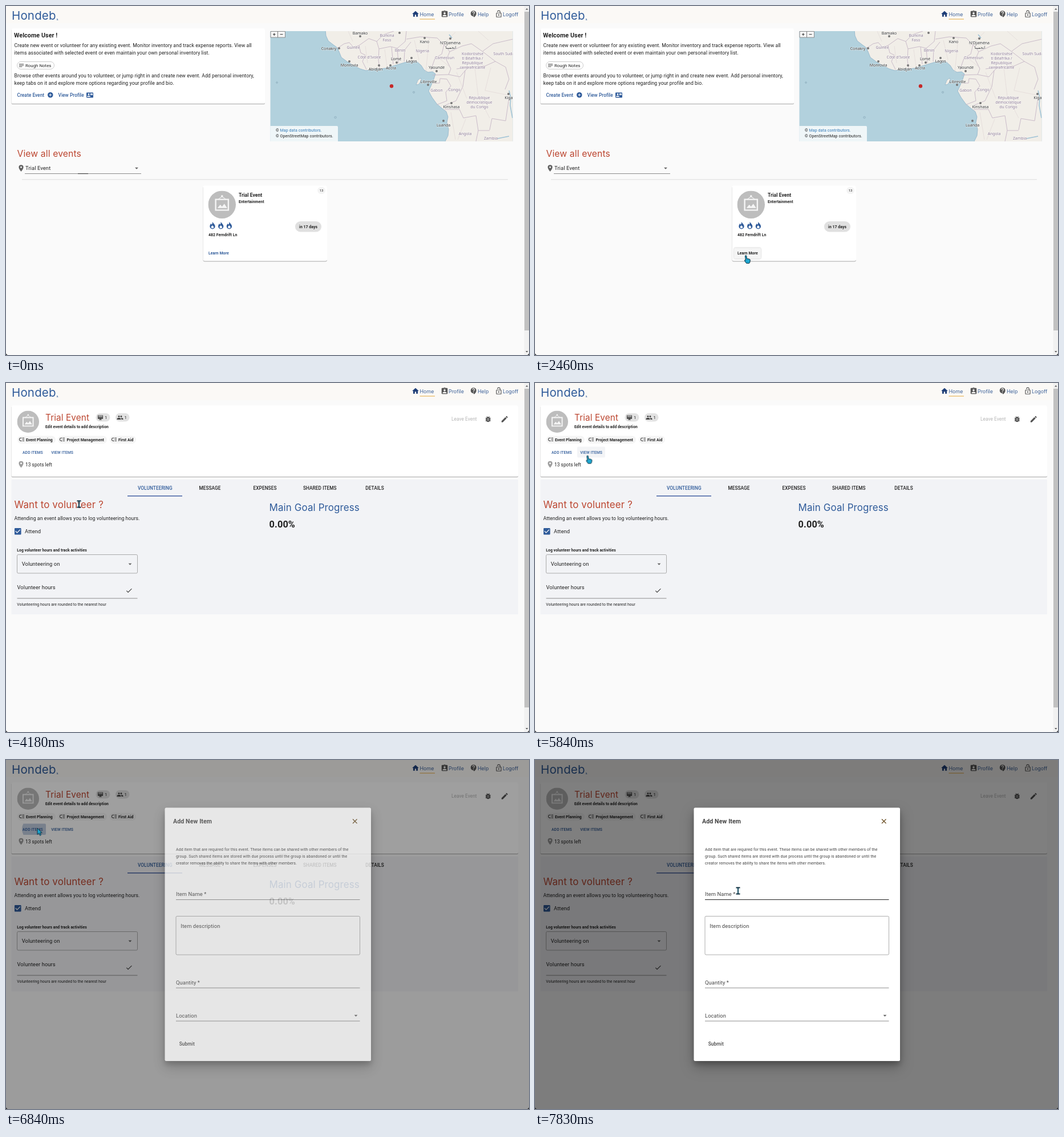
These frames come from a looping animation (917 by 611 pixels, 8000 ms). An HTML page:

```html
<!DOCTYPE html>
<html lang="en">
<head>
<meta charset="utf-8">
<title>Event planner</title>
<style>
html, body { margin: 0; width: 100%; height: 100%; overflow: hidden; background: #fafafa; }
svg { display: block; }
#stage { width: 917px; height: 611px; }
text { font-family: Roboto, sans-serif; letter-spacing: .0094em; fill: #212121; font-size: 8.7px; }
.head { font-family: Inter, sans-serif; letter-spacing: .008em; font-size: 16.9px; }
.nav text { font-family: Inter, sans-serif; font-size: 8.9px; letter-spacing: 0; fill: #3f639a; }
.red { fill: #bc4630; }
.blue, text.blue { fill: #2f5b9a; }
.b { font-weight: 700; }
.m { font-weight: 500; }
.xs { font-size: 6.85px; }
.s { font-size: 8.25px; }
.f { font-size: 9.4px; }
.para text { font-size: 7.06px; fill: #444; }
.form text { fill: #444; }
.line { stroke: #8c8c8c; fill: none; }
.map text { font: 6.9px "Noto Sans", "DejaVu Sans", sans-serif; text-anchor: middle; letter-spacing: 0;
  paint-order: stroke; stroke: #fffc; stroke-width: 1px; fill: #333; }
.map .land text { fill: #8c7a94; }
.card { fill: #fff; filter: drop-shadow(0 1px .7px #0005); }
.sheet { fill: #fff; filter: drop-shadow(0 6px 4px #0003) drop-shadow(0 9px 11px #0004); }

.a { animation: 8s step-end infinite; }
.first { animation-name: first; }
.second { animation-name: second; }
.focus { animation-name: focus; transform-origin: 135px 293px; }
.learn { animation-name: learn; }
.learnText { animation-name: learnText; }
.viewHover { animation-name: viewHover; }
.addHover { animation-name: addHover; }
.ripple { animation-name: ripple; transform-origin: 55px 121px; }
.bar { animation-name: bar; }
.fade { animation-name: fade; }
.nameLine { animation-name: nameLine; }
.arrow { animation-name: arrow; }
.hand { animation-name: hand; }
.beam { animation-name: beam; }
.cursor { animation: move 8s linear infinite; }

@keyframes first { 0% { opacity: 1 } 31.5%, 100% { opacity: 0 } }
@keyframes second { 0% { opacity: 0 } 31.5%, 100% { opacity: 1 } }
@keyframes focus { 0% { transform: none } .875% { transform: scaleX(.4) } 1.75%, 100% { transform: scaleX(0) } }
@keyframes learn { 0% { opacity: 0 } 19.1% { opacity: .5 } 20% { opacity: 1 } 31.5%, 100% { opacity: 0 } }
@keyframes learnText { 0% { fill: #2f5b9a } 19.1%, 100% { fill: #212121 } }
@keyframes viewHover { 0% { opacity: 0 } 66.5% { opacity: 1 } 75.5%, 100% { opacity: 0 } }
@keyframes addHover { 0% { opacity: 0 } 75.5% { opacity: 1 } 85.5%, 100% { opacity: 0 } }
@keyframes ripple {
  0% { opacity: 0; transform: scale(0) }
  82.125% { opacity: 1; transform: scale(.15) }
  82.95% { opacity: 1; transform: scale(.28) }
  83.8% { opacity: 1; transform: scale(.4) }
  84.625% { opacity: 1; transform: scale(.54) }
  85.5% { opacity: 1; transform: scale(.74) }
  86.25% { opacity: .8; transform: none }
  87.1% { opacity: .5; transform: none }
  88% { opacity: .2; transform: none }
  89%, 100% { opacity: 0; transform: none }
}
@keyframes bar { 0% { opacity: 1 } 84.625%, 100% { opacity: 0 } }
@keyframes fade { 0% { opacity: 0 } 84.625% { opacity: .17 } 85.5% { opacity: .75 } 86.25% { opacity: .97 } 87.125%, 100% { opacity: 1 } }
@keyframes nameLine { 0% { stroke: #8c8c8c } 97%, 100% { stroke: #212121 } }
@keyframes arrow {
  0% { opacity: 0 } 6.625% { opacity: 1 } 19.1% { opacity: 0 } 31.5% { opacity: 1 } 51.4% { opacity: 0 }
  55.6% { opacity: 1 } 66.5% { opacity: 0 } 84.625% { opacity: 1 } 92.1% { opacity: 0 }
  94.6% { opacity: 1 } 97%, 100% { opacity: 0 }
}
@keyframes hand { 0% { opacity: 0 } 19.1% { opacity: 1 } 31.5% { opacity: 0 } 66.5% { opacity: 1 } 84.625%, 100% { opacity: 0 } }
@keyframes beam {
  0% { opacity: 0 } 51.4% { opacity: 1 } 55.6% { opacity: 0 } 92.1% { opacity: 1 } 94.6% { opacity: 0 } 97%, 100% { opacity: 1 }
}
@keyframes move {
  0% { transform: translate(930px, 609px) }
  6.625% { transform: translate(930px, 609px); animation-timing-function: steps(12, jump-both) }
  16.625% { transform: translate(376px, 446px) }
  17.375% { transform: translate(376px, 446px); animation-timing-function: steps(5, jump-both) }
  21.625% { transform: translate(370px, 437px) }
  44% { transform: translate(370px, 437px); animation-timing-function: steps(10, jump-both) }
  52.25% { transform: translate(128px, 212px) }
  54.75% { transform: translate(128px, 212px); animation-timing-function: steps(9, jump-both) }
  63.125% { transform: translate(97px, 138px) }
  65.625% { transform: translate(97px, 138px); animation-timing-function: steps(5, jump-both) }
  69.75% { transform: translate(92.5px, 127.5px) }
  73.1% { transform: translate(92.5px, 127.5px); animation-timing-function: steps(6, jump-both) }
  78% { transform: translate(55px, 119.5px) }
  86.3% { transform: translate(55px, 119.5px); animation-timing-function: steps(7, jump-both) }
  92.125% { transform: translate(300px, 172px) }
  92.875% { transform: translate(300px, 172px); animation-timing-function: steps(5, jump-both) }
  97.875%, 100% { transform: translate(356px, 229px) }
}
</style>
</head>
<body>
<svg id="stage" viewBox="0 0 917 611">
<defs>
  <symbol id="home" viewBox="0 0 24 24"><path d="M10 20v-6h4v6h5v-8h3L12 3 2 12h3v8z"/></symbol>
  <symbol id="badge" viewBox="0 0 24 24"><path d="M19 3h-4.2a3 3 0 0 0-5.6 0H5a2 2 0 0 0-2 2v14c0 1.1.9 2 2 2h14a2 2 0 0 0 2-2V5a2 2 0 0 0-2-2zm-7 0a1 1 0 1 1 0 2 1 1 0 0 1 0-2zm0 4a3 3 0 1 1 0 6 3 3 0 0 1 0-6zm6 12H6v-1.4c0-2 4-3.1 6-3.1s6 1.1 6 3.1z"/></symbol>
  <symbol id="help" viewBox="0 0 24 24"><path d="M11.5 2a8.5 8.5 0 0 0 0 17h.5v3c4.9-2.3 8-7 8-11.5A8.5 8.5 0 0 0 11.5 2zm1 14.5h-2v-2h2zm0-3.5h-2c0-3.2 3-3 3-5a2 2 0 0 0-4 0h-2a4 4 0 0 1 8 0c0 2.5-3 2.8-3 5z"/></symbol>
  <symbol id="lock" viewBox="0 0 24 24"><path d="M12 17a2 2 0 1 0 0-4 2 2 0 0 0 0 4zm6-9h-1V6A5 5 0 0 0 7 6h1.9a3.1 3.1 0 0 1 6.2 0v2H6a2 2 0 0 0-2 2v10c0 1.1.9 2 2 2h12a2 2 0 0 0 2-2V10a2 2 0 0 0-2-2zm0 12H6V10h12z"/></symbol>
  <symbol id="notes" viewBox="0 0 24 24"><path d="M3 18h12v-2H3zM3 6v2h18V6zm0 7h18v-2H3z"/></symbol>
  <symbol id="plus" viewBox="0 0 24 24"><path d="M12 2a10 10 0 1 0 0 20 10 10 0 0 0 0-20zm5 11h-4v4h-2v-4H7v-2h4V7h2v4h4z"/></symbol>
  <symbol id="contact" viewBox="0 0 24 24"><path d="M2 3h20a2 2 0 0 1 2 2v14a2 2 0 0 1-2 2H2a2 2 0 0 1-2-2V5c0-1 1-2 2-2zm6 3a3 3 0 1 0 0 6 3 3 0 0 0 0-6zm6 12v-1c0-2-4-3-6-3s-6 1-6 3v1zM14 6v6h8V6zm1 1l3 2 3-2v1l-3 2-3-2z"/></symbol>
  <symbol id="pin" viewBox="0 0 24 24"><path d="M12 2a7 7 0 0 0-7 7c0 5.2 7 13 7 13s7-7.8 7-13a7 7 0 0 0-7-7zm0 9.5a2.5 2.5 0 1 1 0-5 2.5 2.5 0 0 1 0 5z"/></symbol>
  <symbol id="drop" viewBox="0 0 24 24"><path d="M7 10l5 5 5-5z"/></symbol>
  <symbol id="flame" viewBox="0 0 24 24"><path d="M12 1c1 4 8 8 8 14a8 8 0 0 1-16 0c0-4 2-6 4-9 0 2 1 3 2 4 2-3 2-6 2-9zm0 11c-2 2-4 3-4 5a4 4 0 0 0 8 0c0-2-3-3-4-5z" fill-rule="evenodd"/></symbol>
  <symbol id="tasks" viewBox="0 0 24 24"><path d="M14 5h8v2h-8zm0 5.5h8v2h-8zm0 5.5h8v2h-8zM2 11.5A6.5 6.5 0 0 0 8.5 18H9v2l3-3-3-3v2h-.5a4.5 4.5 0 0 1 0-9H12V5H8.5A6.5 6.5 0 0 0 2 11.5z"/></symbol>
  <symbol id="people" viewBox="0 0 24 24"><path d="M16 11a3 3 0 1 0-3-3 3 3 0 0 0 3 3zm-8 0a3 3 0 1 0-3-3 3 3 0 0 0 3 3zm0 2c-2.3 0-7 1.2-7 3.5V19h14v-2.5C15 14.2 10.3 13 8 13zm8 0h-1c1.2.9 2 2 2 3.5V19h6v-2.5c0-2.3-4.7-3.5-7-3.5z"/></symbol>
  <symbol id="screen" viewBox="0 0 24 24"><path d="M2 3h20v14h-8v2h3v2H7v-2h3v-2H2zm2 2v2h16V5zm0 4v2h16V9z" fill-rule="evenodd"/></symbol>
  <symbol id="bug" viewBox="0 0 24 24"><path d="M20 8h-2.8a6 6 0 0 0-1.8-2L17 4.4 15.6 3l-2.2 2.2a6 6 0 0 0-2.8 0L8.4 3 7 4.4 8.6 6a6 6 0 0 0-1.8 2H4v2h2.1L6 12H4v2h2l.1 2H4v2h2.8a6 6 0 0 0 10.4 0H20v-2h-2.1l.1-2h2v-2h-2l-.1-2H20zm-6 8h-4v-2h4zm0-4h-4v-2h4z"/></symbol>
  <symbol id="edit" viewBox="0 0 24 24"><path d="M3 17.2V21h3.8L17.8 9.9l-3.7-3.7zM20.7 7a1 1 0 0 0 0-1.4l-2.3-2.3a1 1 0 0 0-1.4 0l-1.9 1.8 3.8 3.8z"/></symbol>
  <symbol id="check" viewBox="0 0 24 24"><path d="M9 16.2 4.8 12l-1.4 1.4L9 19 21 7l-1.4-1.4z"/></symbol>
  <symbol id="box" viewBox="0 0 24 24"><path d="M19 3H5a2 2 0 0 0-2 2v14c0 1.1.9 2 2 2h14a2 2 0 0 0 2-2V5a2 2 0 0 0-2-2zm-9 14l-5-5 1.4-1.4 3.6 3.6 7.6-7.6L19 8z"/></symbol>
  <symbol id="avatar" viewBox="0 0 48 48">
    <circle cx="24" cy="24" r="24" fill="#bdbdbd"/>
    <g fill="none" stroke="#f5f5f5" stroke-width="2.4"><path d="M13 15h22v18.5H13z"/><path d="M17 15l7-5 7 5" stroke-width="1"/></g>
    <path d="M16 30l5-6 3 3.5 4-5 5 7.5zM24 7.5a1.7 1.7 0 1 0 .1 0z" fill="#f5f5f5"/>
  </symbol>
  <clipPath id="mapClip"><path d="M463.5 44h425v193h-425z"/></clipPath>
  <clipPath id="addClip"><rect x="24" y="111.5" width="46" height="19.5" rx="2"/></clipPath>
</defs>

<path fill="#fafafa" d="M0 0h917v611H0z"/>
<path fill="#fbf9f6" d="M0 0h917v30H0z"/>
<text class="head blue" x="10" y="23.7" style="font-size:20.5px">Hondeb</text>
<text class="blue" x="88.5" y="24.5" style="font-size:5px">a.</text>
<g class="nav" fill="#555">
  <use href="#home" x="711" y="7" width="14" height="14" fill="#1f3f78"/><text x="725.5" y="18.3">Home</text>
  <path d="M725.5 23h26.5" stroke="#e9b75c" stroke-width="1.2"/>
  <use href="#badge" x="762" y="7" width="14" height="14"/><text x="776" y="18.3">Profile</text>
  <use href="#help" x="813" y="7" width="14" height="14"/><text x="827" y="18.3">Help</text>
  <use href="#lock" x="857" y="7" width="14" height="14"/><text x="871" y="18.3">Logoff</text>
</g>

<g class="a first">
  <rect class="card" x="9.5" y="39.5" width="444.5" height="131.5" rx="2"/>
  <text class="b" x="14" y="55.3" style="font-size:10.7px">Welcome User !</text>
  <text x="14.5" y="72.3">Create new event or volunteer for any existing event. Monitor inventory and track expense reports. View all</text>
  <text x="14.5" y="85.3">items associated with selected event or even maintain your own personal inventory list.</text>
  <rect x="19.5" y="97.5" width="65" height="13" rx="6.5" fill="#fff" stroke="#bdbdbd" stroke-width=".8"/>
  <use href="#notes" x="21.5" y="98.5" width="11" height="11" fill="#555"/>
  <text x="34" y="106.8" style="font-size:7.75px">Rough Notes</text>
  <text x="14.5" y="125.3">Browse other events around you to volunteer, or jump right in and create new event. Add personal inventory,</text>
  <text x="14.5" y="138.3">keep tabs on it and explore more options regarding your profile and bio.</text>
  <g class="blue">
    <text class="m s blue" x="19.5" y="158.8">Create Event</text><use href="#plus" x="72" y="150" width="11.5" height="11.5"/>
    <text class="m s blue" x="91.5" y="158.8">View Profile</text><use href="#contact" x="141" y="150" width="12" height="12"/>
  </g>

  <g class="map" clip-path="url(#mapClip)">
    <path fill="#b2d1dd" d="M463 44h426v193H463z"/>
    <path fill="#f1eee8" stroke="#8fb3c9" stroke-width=".8" d="M560 42l1 10 4 9 9 7 7 5 3 7 4 10 11 8 12 7 10 5 10 3 12-2 22-2 17-5 20-6 18-1 8 7 5 8 7 4 8-1 5 4-3 9-5 12-4 9 6 11 8 11 8 7 9 7 3 9-2 10 3 12-1 11-6 12h130V42z"/>
    <path fill="#f1eee8" stroke="#8fb3c9" stroke-width=".7" d="M719 138l3-8 5-4 1 4-4 7z"/>
    <g fill="none" stroke="#c6b6c6" stroke-width=".9">
      <path d="M581 74l12-8 9-2 7 8 10-3 3 13 8 4-5 11 7 14M619 69l17-12 14 5 4 13-1 20 2 14M650 62l12-12 18-6M654 75l20-4 12 3 2 26M676 72l3 30M686 74l14-12 2-18M698 97l1-20 11-14M702 58l24-4 30 2 12 12-4 16-12 8-7 20M768 68l10 12-6 14 8 16-4 10-28 1M778 80l22-10 16-4 20 14 22 17-18 8-24 2-26 3M748 135h12l1-8 12 1 7 12-9 11 2 15-18 7M776 120l20 4 9-11 8-7M805 113l-4 28-12 25-20 8M769 181l26 0 7 15 22-4 4 26h20M828 218l-4 19M848 217l4-20 24 4 6-40M858 97l18 10 6 21-7 18M836 79l18-13 35-8"/>
      <path stroke="#ddd4d4" stroke-width=".6" d="M600 44l8 18M634 100l-4-30M668 106l-4-30M716 60l8 34M742 56l-6 60M762 70l26-24M790 116l18 46M822 108l6 50 20 38M850 108l-10 40 40 8M780 186l8 48M806 198l-14 36M846 60l-18-16M760 92l20 16"/>
    </g>
    <path fill="none" stroke="#9fc3d6" stroke-width="1.6" d="M882 148l3 12-1 14 4 22M862 232l20-4M777 50l5 6"/>
    <g fill="none" stroke="#88a9b9" stroke-width=".8"><circle cx="475" cy="134" r="1.3"/><circle cx="577.5" cy="195" r="1.7"/><circle cx="715" cy="151" r="1.5"/></g>
    <path fill="none" stroke="#777" stroke-width="4" stroke-linecap="round" d="M621 53h0M584 74h0M602 97h0M654 104h0M674 104h0M685 99h0M711 91h0M690 47h0M734 56h0M779 57h0M755 114h0M740 138h0M781 170h0M767 201h0M881 154h0"/>
    <g class="land">
      <text x="609" y="75">Guinée</text><text x="668" y="54">Burkina</text><text x="668" y="62">Faso</text>
      <text x="637" y="92">Côte d'Ivoire</text><text x="691" y="79.5">Bénin</text><text x="730" y="81">Nigeria</text>
      <text x="769" y="92.5">Cameroun</text><text x="755" y="149.5">Gabon</text><text x="786" y="148.5">Congo</text>
      <text x="818" y="85.5">Kodorösëse</text><text x="818" y="93.5">tî Bêafrîka /</text><text x="818" y="101.5">République</text><text x="818" y="109.5">centrafricaine</text>
      <text x="830" y="162.5">République</text><text x="830" y="170.5">démocratique</text><text x="830" y="178.5">du Congo</text>
      <text x="875" y="85.5">South Sudan</text><text x="805" y="225.5">Angola</text><text x="850" y="234">Zambia</text>
    </g>
    <text x="621" y="49.5">Bamako</text><text x="566" y="77">Conakry</text><text x="602" y="105.5">Monrovia</text>
    <text x="648" y="113">Abidjan</text><text x="675" y="111">Accra</text><text x="684" y="95">Lomé</text><text x="711" y="99">Lagos</text>
    <text x="734" y="64.5">Kano</text><text x="779" y="67">N'Djaména</text><text x="780" y="75">انجمينا</text>
    <text x="755" y="110">Yaoundé</text><text x="741" y="134.5">Libreville</text><text x="781" y="178.5">Kinshasa</text>
    <text x="767" y="210.5">Luanda</text><text x="883" y="162.5">Kigali</text>
    <circle cx="676" cy="140.3" r="3.2" fill="#c62828"/>
    <path fill="#fffc" d="M463 210h117q2 0 2 2v26H463z"/>
  </g>
  <text x="473" y="220.3" style="font-size:7.1px">© <tspan fill="#337ab7">Map data contributors.</tspan></text>
  <text x="473" y="230.3" style="font-size:7.1px">© OpenStreetMap contributors.</text>
  <path fill="#f6f6f6" stroke="#777" stroke-width=".8" d="M464 44.5h12.5V55H464zM476.5 44.5H489.5V55H476.5z"/>
  <path stroke="#333" d="M468 49.7h4.5M470.25 47.5v4.5M480.5 49.7h5"/>

  <text class="head red" x="19.5" y="263.5" style="font-size:15.7px">View all events</text>
  <use href="#pin" x="19.5" y="277" width="14" height="14" fill="#616161"/>
  <text class="f" x="34" y="287.3">Trial Event</text>
  <use href="#drop" x="222" y="277" width="14" height="14" fill="#616161"/>
  <path class="line" d="M33 293.5h204"/>
  <path class="a focus" stroke="#444" stroke-width="1.2" d="M126 293.5h18"/>
  <path stroke="#dcdcdc" d="M28 303.8h852"/>

  <rect class="card" x="345.5" y="314.5" width="217.5" height="132" rx="3"/>
  <use href="#avatar" x="354.5" y="323.5" width="48.5" height="48.5"/>
  <text class="b" x="408" y="333.5" style="font-size:8.5px">Trial Event</text>
  <text class="b xs" x="408" y="345.3">Entertainment</text>
  <rect x="546" y="317" width="14" height="12" rx="6" fill="#f4f4f4"/>
  <text x="549.7" y="325.3" style="font-size:6px">13</text>
  <g class="blue"><use href="#flame" x="355" y="377" width="14" height="14"/><use href="#flame" x="369.7" y="377" width="14" height="14"/><use href="#flame" x="384.4" y="377" width="14" height="14"/></g>
  <rect x="507" y="377" width="46" height="18.5" rx="9.25" fill="#e0e0e0"/>
  <text class="b xs" x="514" y="388.6">in 17 days</text>
  <text class="b xs" x="355" y="403">482 Ferndrift Ln</text>
  <rect class="a learn" x="349" y="423.5" width="47" height="19" rx="2" fill="#f5f5f5" style="filter:drop-shadow(0 .5px 1px #0004)"/>
  <text class="b xs a learnText" x="355" y="435.4">Learn More</text>
</g>

<g class="a second">
  <rect class="card" x="9.5" y="39.5" width="888.5" height="124.5" rx="2"/>
  <use href="#avatar" x="19.5" y="48.5" width="38.5" height="38.5"/>
  <text class="head red" x="69" y="66" style="font-size:15.3px">Trial Event</text>
  <g fill="#e2e2e2"><rect x="157.5" y="53" width="25" height="14.5" rx="7.25"/><rect x="192" y="53" width="24.5" height="14.5" rx="7.25"/></g>
  <use href="#screen" x="160" y="55" width="11" height="11" fill="#444"/><text x="173" y="63.2" style="font-size:7.7px">1</text>
  <use href="#people" x="194" y="54.5" width="12" height="12" fill="#444"/><text x="207.5" y="63.2" style="font-size:7.7px">1</text>
  <text class="b" x="69" y="79.3" style="font-size:6.75px">Edit event details to add description</text>
  <g fill="#f5f5f5"><rect x="20" y="92.5" width="67" height="13.5" rx="6.75"/><rect x="91" y="92.5" width="86" height="13.5" rx="6.75"/><rect x="182" y="92.5" width="46" height="13.5" rx="6.75"/></g>
  <g fill="#444"><use href="#tasks" x="22" y="93.5" width="11" height="11"/><use href="#tasks" x="93" y="93.5" width="11" height="11"/><use href="#tasks" x="184" y="93.5" width="11" height="11"/></g>
  <text class="b xs" x="35" y="101.6">Event Planning</text><text class="b xs" x="106.5" y="101.6">Project Management</text><text class="b xs" x="197" y="101.6">First Aid</text>
  <rect class="a addHover" x="24" y="111.5" width="46" height="19.5" rx="2" fill="#2f5b9a" fill-opacity=".06"/>
  <g clip-path="url(#addClip)"><circle class="a ripple" cx="55" cy="121" r="36" fill="#2f5b9a" fill-opacity=".3"/></g>
  <rect class="a viewHover" x="74" y="111.5" width="49" height="19" rx="2" fill="#f3f4f6"/>
  <text class="m xs blue" x="29" y="123.5">ADD ITEMS</text><text class="m xs blue" x="79.3" y="123.5">VIEW ITEMS</text>
  <use href="#pin" x="19.5" y="135.5" width="14" height="14" fill="#9e9e9e"/><text class="s" x="34" y="145.5">13 spots left</text>
  <text class="s" x="781" y="65.7" style="fill:#b5b5b5">Leave Event</text>
  <use href="#bug" x="838.5" y="56.5" width="13.5" height="13.5" fill="#555"/><use href="#edit" x="867" y="56" width="14.5" height="14.5" fill="#555"/>

  <path fill="#f2f3f6" d="M9.5 169H898v236H9.5z"/>
  <g class="m" text-anchor="middle">
    <text class="s blue" x="261.3" y="186.8">VOLUNTEERING</text><text class="s" x="357.5" y="186.8">MESSAGE</text><text class="s" x="454" y="186.8">EXPENSES</text>
    <text class="s" x="550.3" y="186.8">SHARED ITEMS</text><text class="s" x="646.5" y="186.8">DETAILS</text>
  </g>
  <path stroke="#4561a4" stroke-width="1.4" d="M213 197.7h96"/>
  <text class="head red" x="14.5" y="219">Want to volunteer ?</text>
  <text x="14.5" y="239.8">Attending an event allows you to log volunteering hours.</text>
  <use href="#box" x="13" y="252" width="15.5" height="15.5" class="blue"/><text class="f" x="33" y="262.8">Attend</text>
  <text class="b" x="19.3" y="294.6" style="font-size:6.75px">Log volunteer hours and track activities</text>
  <rect class="line" x="19.5" y="300.5" width="211" height="32.5" rx="2" stroke-opacity=".7"/>
  <text class="f" x="27.7" y="320.2">Volunteering on</text><use href="#drop" x="210.5" y="310" width="14" height="14" fill="#616161"/>
  <text class="f" x="19.5" y="361">Volunteer hours</text><use href="#check" x="209" y="356.5" width="13.5" height="13.5" fill="#444"/>
  <path class="line" d="M19.5 377h211"/>
  <text x="19.3" y="389.6" style="font-size:6.8px">Volunteering hours are rounded to the nearest hour</text>
  <text class="head blue" x="461.5" y="223.8">Main Goal Progress</text>
  <text class="b" x="461.5" y="253.3" style="font-size:16.3px">0.00%</text>
</g>

<g class="a bar">
  <path fill="#f1f1f1" d="M908.5 0h8.5v611h-8.5z"/>
  <path fill="#c1c1c1" d="M909 10h8v558h-8z"/>
  <path fill="#555" d="M911 6.5l2.2-2.5 2.2 2.5zM911 604l2.2 2.5 2.2-2.5z"/>
</g>

<!-- Backdrop and dialog fade separately so the dim page shows through the dialog -->
<path class="a fade" fill="#000" fill-opacity=".5" d="M0 0h917v611H0z"/>
<g class="a fade form">
  <rect class="sheet" x="278.5" y="83.5" width="361.5" height="443.5" rx="2.5"/>
  <text class="b blue" x="293" y="111" style="font-size:10.6px">Add New Item</text>
  <path d="M608 103.5l7.5 7.5m0-7.5l-7.5 7.5" stroke="#6b4f25" stroke-width="1.3"/>
  <g class="para">
    <text x="298" y="158.7">Add item that are required for this event. These items can be shared with other members of the</text>
    <text x="298" y="170.7">group. Such shared items are stored with due process until the group is abandoned or until the</text>
    <text x="298" y="182.7">creator removes the ability to share the items with other members.</text>
  </g>
  <text class="f" x="298" y="238.2">Item Name *</text>
  <path class="line a nameLine" d="M298 244.5h322.5"/>
  <rect class="line" x="298" y="273.5" width="322.5" height="67.5" rx="2" stroke-opacity=".7"/>
  <text class="f" x="306.3" y="293.5">Item description</text>
  <text class="f" x="298" y="393.2">Quantity *</text><path class="line" d="M298 399h322.5"/>
  <text class="f" x="298" y="451.2">Location</text><path class="line" d="M298 457h322.5"/>
  <use href="#drop" x="606.5" y="440.5" width="14" height="14" fill="#616161"/>
  <text class="m blue" x="303.7" y="499.7" style="font-size:8.4px">Submit</text>
</g>

<path fill="#111" d="M0 608v3h3q-2.5-.5-3-3zM917 608v3h-3q2.5-.5 3-3z"/>

<g class="cursor" stroke="#0c2c3c" stroke-linejoin="round">
  <path class="a arrow" fill="#1ea7d0" d="M0 0v11l2.7-2.3 1.9 4 1.9-.9-1.9-3.9h3.7z"/>
  <path class="a hand" fill="#1ea7d0" d="M-1.5 1q0-1.3 1.1-1.3T.9 1l.6 4.3 4 .7q1.9.4 1.8 2.1l-.4 2.9q-.3 1.6-1.3 2.4H.6l-3-4.2q-.7-1.4.8-1.7l1 .6z"/>
  <g class="a beam"><path fill="none" stroke-width="2" d="M-3.5-5.5h7M-3.5 5.5h7M0-5.5v11"/><path fill="none" stroke="#1e7f9e" stroke-width=".7" d="M0-5v10"/></g>
</g>
</svg>
</body>
</html>
```
